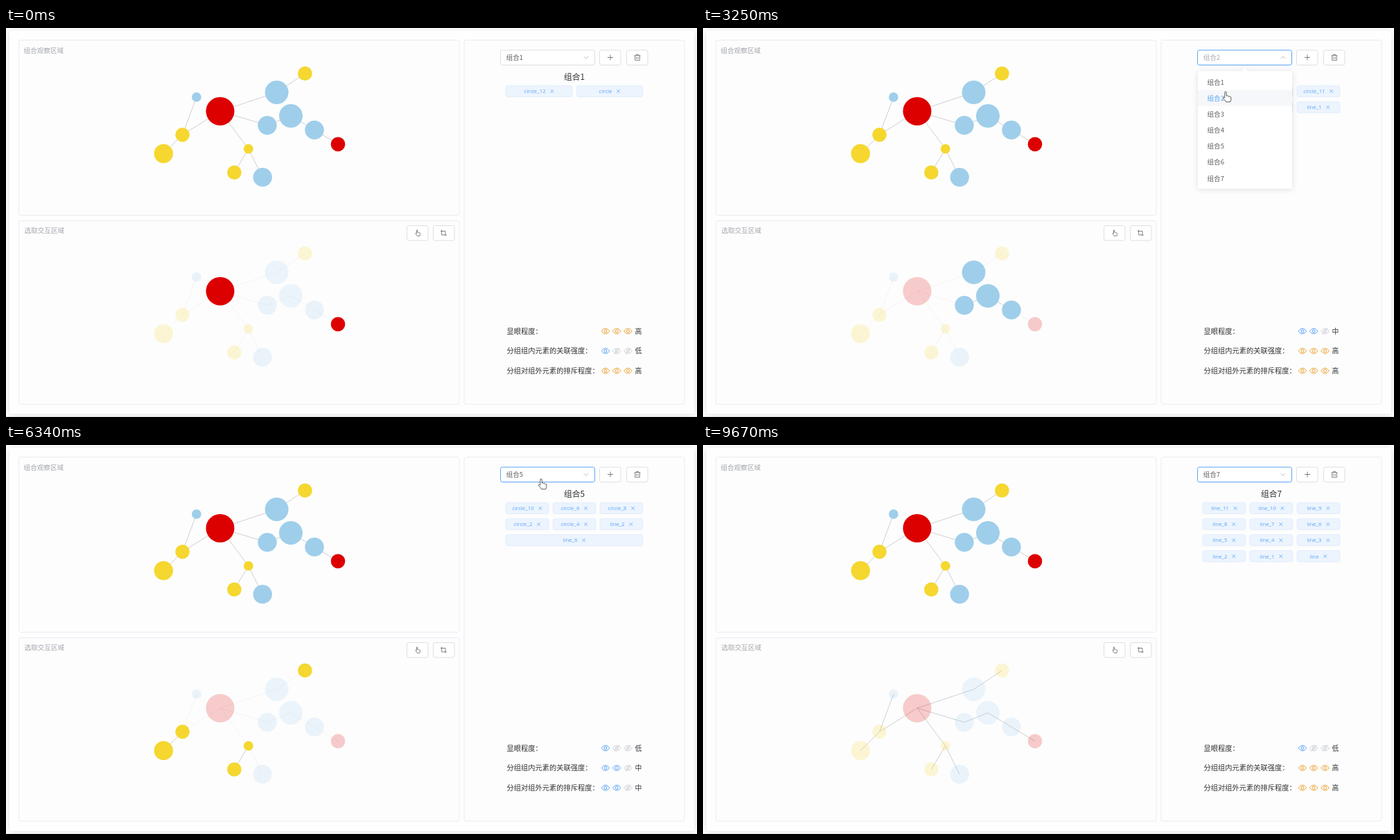
Recreate the animation shown at these times as an HTML page. Size 997x562 px, loop 9890 ms.

```html
<!DOCTYPE html>
<html lang="zh-CN">
<head>
<meta charset="utf-8">
<title>组合</title>
<style>
html, body { margin: 0; width: 100%; height: 100%; overflow: hidden; background: #fff; }
svg { display: block; width: 100vw; height: 100vh; }
text { font-family: "Noto Sans CJK SC", "Noto Sans CJK", sans-serif; font-size: 9.6px; fill: #606266; }
.panel { fill: #fdfdfd; stroke: #e9ecf2; }
.btn { fill: #fff; stroke: #dcdfe6; }
.icon { fill: none; stroke: #606266; stroke-width: .8; }
.head { fill: #a3a6ad; }
.label { font-size: 10.25px; fill: #303133; }
.name { font-size: 11.8px; fill: #303133; text-anchor: middle; }
.tag rect { fill: #ecf4fe; stroke: #dfecfd; stroke-width: .8; }
.tag text { font-family: "Open Sans", "Noto Sans", sans-serif; font-size: 7.8px; fill: #5ba4f6; text-anchor: middle; }
.tag path { stroke: #5ba4f6; stroke-width: .8; }
.eye { fill: none; stroke-width: 1; }
.card { filter: drop-shadow(0 1px 4px rgba(0, 0, 0, .13)); }
.drop { filter: drop-shadow(0 1px 4px rgba(0, 0, 0, .12)); }
</style>
</head>
<body>
<svg id="stage" viewBox="0 0 997 562" preserveAspectRatio="none"></svg>
<script>
const LOOP = 9890;
const BLUE = [90, 164, 248], ORANGE = [236, 160, 48], GREY = [203, 207, 214];
const HAND = 'M-1.2 9V1.2a1.2 1.2 0 0 1 2.4 0V6q2-.8 2.4.6q1.7-.4 2.2.6q2-.2 2 1.4v3q0 1.4-1 3.2h-6.2q-1.4-2.8-4.2-5.2q-.2-1.8 1.4-1.4z';
const ARROW = 'M0 0V12l2.8-2.6 2 4.6 1.8-.8-2-4.5h3.8z';
const FILL = { r: '#dd0000', b: '#9fceeb', y: '#f5d72f' };

const nodes = [
  [309, 120.2, 20.5, 'r'], [390.6, 93, 17, 'b'], [431.4, 65.8, 10.3, 'y'], [377, 140.6, 13.7, 'b'],
  [411, 127, 17, 'b'], [445, 147.4, 13.7, 'b'], [479, 167.9, 10.3, 'r'], [254.6, 154.3, 10.3, 'y'],
  [274.9, 99.9, 6.8, 'b'], [227.3, 181.5, 13.7, 'y'], [349.8, 174.7, 6.9, 'y'], [329.4, 208.8, 10.3, 'y'],
  [370.2, 215.6, 13.7, 'b']
];
const edges = [[0, 1], [1, 2], [0, 3], [3, 4], [4, 5], [5, 6], [0, 7], [7, 8], [7, 9], [0, 10], [10, 11], [10, 12]];

const groups = [
  { lit: [0, 6], links: [], rates: [3, 1, 3], tags: 'circle_12 circle' },
  { lit: [1, 3, 4, 5], links: [3, 4], rates: [2, 3, 3], tags: 'circle_9 circle_7 circle_11 circle_3 line_7 line_1' },
  { lit: [7, 9], links: [8], rates: [2, 3, 3], tags: 'circle_10 circle_6 line_6' },
  { lit: [10, 11, 12], links: [10, 11], rates: [2, 3, 2], tags: 'circle_8 circle_4 circle_5 line_2 line_3' },
  { lit: [2, 7, 9, 10, 11], links: [8, 10], rates: [1, 2, 2], tags: 'circle_10 circle_6 circle_8 circle_2 circle_4 line_2 line_6' },
  { lit: [1, 3, 4, 5, 12], links: [3, 4], rates: [3, 2, 3], tags: 'circle_9 circle_11 circle_7 circle_3 circle_5 line_1 line_3 line_7' },
  { lit: [], links: edges.map((_, i) => i), rates: [1, 3, 3],
    tags: Array.from({ length: 12 }, (_, i) => i < 11 ? 'line_' + (11 - i) : 'line').join(' ') }
];

// [menu opens, option picked]; the n-th visit picks group n + 1
const visits = [[1370, 2140], [2930, 3640], [4130, 4790], [5260, 5830], [6400, 6960], [7600, 8130]];

// [time, x, y] of the pointer tip
const path = [
  [170, 992, 560], [1150, 803, 45], [1200, 803, 43], [1360, 803, 43], [2060, 782, 98], [2230, 781.5, 97],
  [2500, 772, 49], [2960, 772, 49], [3250, 754, 92], [3560, 751, 121], [3680, 752, 121], [3830, 776, 28],
  [3950, 772, 46], [4130, 772, 46], [4650, 749.5, 142], [4840, 750, 144], [5090, 772, 47], [5270, 772, 47],
  [5750, 750, 167], [5880, 751, 167], [6210, 772, 48], [6340, 772, 49], [6420, 772, 49], [6880, 749, 189],
  [7010, 750, 190], [7420, 772, 48], [7610, 771, 50], [7770, 747, 181], [8050, 762, 213], [8200, 768, 215],
  [8630, 793, 232], [8790, 793, 232], [9670, 985, 566]
];

const clamp = v => Math.max(0, Math.min(1, v));
const mix = (a, b, k) => a + (b - a) * k;

function bezier(x1, y1, x2, y2) {
  const at = (a, b, s) => 3 * (1 - s) * (1 - s) * s * a + 3 * (1 - s) * s * s * b + s * s * s;
  return x => {
    if (x <= 0 || x >= 1) return clamp(x);
    let lo = 0, hi = 1;
    for (let i = 0; i < 22; i++) {
      const mid = (lo + hi) / 2;
      if (at(x1, x2, mid) < x) lo = mid; else hi = mid;
    }
    return at(y1, y2, lo);
  };
}
const ease = bezier(.25, .1, .25, 1);
const zoomTop = bezier(.23, 1, .32, 1);
const zoomMid = bezier(.55, 0, .1, 1);
const glide = bezier(.4, 0, .6, 1);

function el(tag, attrs, parent, content) {
  const e = document.createElementNS('http://www.w3.org/2000/svg', tag);
  set(e, attrs);
  if (content !== undefined) e.textContent = content;
  parent.appendChild(e);
  return e;
}
function set(e, attrs) {
  for (const k in attrs) e.setAttribute(k, attrs[k]);
}
const root = document.getElementById('stage');
const box = (x, y, w, h, cls, parent = root) => el('rect', { x, y, width: w, height: h, rx: 2.7, class: cls }, parent);
const label = (x, y, str, cls = '', parent = root) => el('text', { x, y, class: cls }, parent, str);
const icon = (x, y, d, k = 1) => el('path', { d, class: 'icon', transform: `translate(${x} ${y}) scale(${k})` }, root);

// frame and panels
el('path', { d: 'M0 561.5H997', stroke: '#e6e8ec' }, root);
el('rect', { x: 5, y: 4, width: 988, height: 553.5, rx: 3, fill: '#fefefe', class: 'card' }, root);
box(18.5, 17.5, 635.5, 253, 'panel');
box(18.5, 278.5, 635.5, 265, 'panel');
box(661, 17.5, 318, 526, 'panel');
label(25.6, 36.2, '组合观察区域', 'head');
label(26.6, 296.4, '选取交互区域', 'head');

[[578.5, 285.5], [616.5, 285.5], [856.5, 32], [895.5, 32]].forEach(p => box(p[0], p[1], 30.5, 21.5, 'btn'));
icon(593, 291.8, HAND, .58).style.strokeWidth = 1.4;
icon(631.3, 296.2, 'M-2.7-4.3V2.7H4.3M-4.3-2.7H2.7V4.3');
icon(872, 42.5, 'M-4 0H4M0-4V4');
icon(911, 42.5, 'M-4.3-2.7H4.3M-1.6-2.7V-4.2H1.6V-2.7M-3.3-2.7V4.2H3.3V-2.7M-1.2-.6V2.2M1.2-.6V2.2');

function graph(dy) {
  const g = el('g', { transform: `translate(0 ${dy})` }, root);
  const links = edges.map(([a, b]) => el('line', {
    x1: nodes[a][0], y1: nodes[a][1], x2: nodes[b][0], y2: nodes[b][1], stroke: '#cfcfcf', 'stroke-width': 1
  }, g));
  const dots = nodes.map(([cx, cy, r, c]) => el('circle', { cx, cy, r, fill: FILL[c] }, g));
  return { links, dots };
}
graph(0);
const picker = graph(260);

// select box
const field = box(713.5, 32, 136, 21.5, 'btn');
const value = label(721.7, 46.3, '');
const chevron = el('path', { d: 'M-3.3-1.6L0 1.7L3.3-1.6', fill: 'none', stroke: '#b4b8c0', 'stroke-width': .9 }, root);
const title = label(820, 74.6, '', 'name');

function buildTags(group) {
  const words = group.tags.split(' ');
  const wrap = el('g', { class: 'tag' }, root);
  group.wrap = wrap;
  group.parts = words.map((word, i) => {
    const row = Math.floor(i / 3), n = Math.min(3, words.length - row * 3);
    const w = (197.6 - 6.3 * (n - 1)) / n;
    const cx = 721.2 + (i % 3) * (w + 6.3) + w / 2;
    const g = el('g', {}, wrap);
    el('rect', { x: -w / 2, y: -8.1, width: w, height: 16.2, rx: 2.7 }, g);
    const len = el('text', { x: -6, y: 2.8 }, g, word).getComputedTextLength();
    el('path', { d: 'M-2.3-2.3L2.3 2.3M2.3-2.3L-2.3 2.3', transform: `translate(${len / 2 + 3.2} 0)` }, g);
    return { g, cx, cy: 91.4 + row * 23.1 };
  });
}
groups.forEach(buildTags);

// ratings
const rows = ['显眼程度：', '分组组内元素的关联强度：', '分组对组外元素的排斥程度：'].map((str, i) => {
  const y = 438 + i * 28.6;
  label(722.6, y + 3.8, str, 'label');
  const eyes = [865, 881.2, 897.5].map(x => {
    const g = el('g', { class: 'eye', transform: `translate(${x} ${y})` }, root);
    el('path', { d: 'M-5.9 0Q0-7.8 5.9 0Q0 7.8-5.9 0Z' }, g);
    el('circle', { r: 2 }, g);
    return { g, slash: el('path', { d: 'M-3.8 4.6L3.8-4.6' }, g) };
  });
  return { eyes, word: label(907.6, y + 3.6, '', 'label') };
});
rows.forEach(r => r.word.style.fontSize = '9.8px');

// menu
const menu = el('g', { class: 'drop' }, root);
el('path', { d: 'M777 62.5L781.5 58L786 62.5', fill: '#fff' }, menu);
box(714, 62.3, 136, 170, '', menu).setAttribute('fill', '#fff');
const hover = el('rect', { x: 714, width: 136, height: 23.15, fill: '#f5f7fa' }, menu);
const options = groups.map((_, i) => label(727.5, 81.6 + i * 23.15, '组合' + (i + 1), '', menu));

const hand = el('path', { d: HAND, fill: '#fff', stroke: '#333', 'stroke-width': .8 }, root);
const arrow = el('path', { d: ARROW, fill: '#fff', stroke: '#222', 'stroke-width': .7 }, root);

function pointer(t) {
  let i = 0;
  while (i < path.length - 2 && t >= path[i + 1][0]) i++;
  const a = path[i], b = path[i + 1], k = glide(clamp((t - a[0]) / (b[0] - a[0])));
  return [mix(a[1], b[1], k), mix(a[2], b[2], k)];
}

const eyeColor = (rate, i) => i >= rate ? GREY : rate === 3 ? ORANGE : BLUE;

function draw(t) {
  const picked = visits.filter(v => t >= v[1]).length;
  const since = picked ? t - visits[picked - 1][1] : 1e4;
  const now = groups[picked], before = groups[Math.max(0, picked - 1)];
  const visit = visits.filter(v => t >= v[0]).pop();
  const isOpen = !!visit && t < visit[1] + 25;
  let open = 0;
  if (visit) open = isOpen ? zoomTop((t - visit[0]) / 300) : 1 - zoomTop((t - visit[1] - 25) / 300);
  const [x, y] = pointer(t);

  picker.dots.forEach((d, i) => d.setAttribute('opacity', now.lit.includes(i) ? 1 : .2));
  picker.links.forEach((l, i) => l.setAttribute('opacity', now.links.includes(i) ? 1 : .2));

  title.textContent = value.textContent = '组合' + (picked + 1);
  value.style.fill = isOpen ? '#a8abb2' : '#606266';
  field.style.stroke = t >= 1360 ? '#5ba4f6' : '#dcdfe6';
  const turn = visit ? ease((t - (isOpen ? visit[0] : visit[1] + 25)) / 300) : 0;
  chevron.setAttribute('transform', `translate(836.8 42.6) rotate(${180 * (isOpen ? turn : visit ? 1 - turn : 0)})`);

  const grow = zoomMid((since - 25) / 300);
  groups.forEach(g => g.wrap.setAttribute('visibility', g === now ? 'visible' : 'hidden'));
  now.parts.forEach(p => set(p.g, { transform: `translate(${p.cx} ${p.cy}) scale(${Math.max(grow, .001)} 1)`, opacity: grow }));

  const fade = ease(since / 300);
  rows.forEach((row, r) => {
    const rate = now.rates[r];
    row.word.textContent = '低中高'[rate - 1];
    row.eyes.forEach((eye, i) => {
      const from = eyeColor(before.rates[r], i), to = eyeColor(rate, i);
      eye.g.style.stroke = `rgb(${from.map((c, j) => Math.round(mix(c, to[j], fade)))})`;
      eye.slash.setAttribute('visibility', i >= rate ? 'visible' : 'hidden');
    });
  });

  set(menu, {
    transform: `translate(0 ${62 * (1 - open)}) scale(1 ${Math.max(open, .001)})`,
    opacity: open, visibility: open > 0 ? 'visible' : 'hidden'
  });
  const over = Math.floor((pointer(t - 45)[1] - 66.4) / 23.15);
  hover.setAttribute('y', 66.4 + 23.15 * (over < 0 ? (y > 66 ? 0 : picked) : Math.min(over, 6)));
  options.forEach((o, i) => o.style.fill = i === picked ? '#5ba4f6' : '#606266');

  const shown = t >= 170 && t < 9670;
  const onField = x > 713 && x < 850 && y > 30 && y < 54;
  const onMenu = open > .05 && x > 713 && x < 850 && y < 233;
  const asHand = onField || onMenu;
  [[hand, asHand], [arrow, !asHand]].forEach(([c, on]) => set(c, {
    transform: `translate(${x} ${y})`, visibility: shown && on ? 'visible' : 'hidden'
  }));
}

const start = performance.now();
function tick() {
  draw((performance.now() - start) % LOOP);
  requestAnimationFrame(tick);
}
tick();
</script>
</body>
</html>
```
